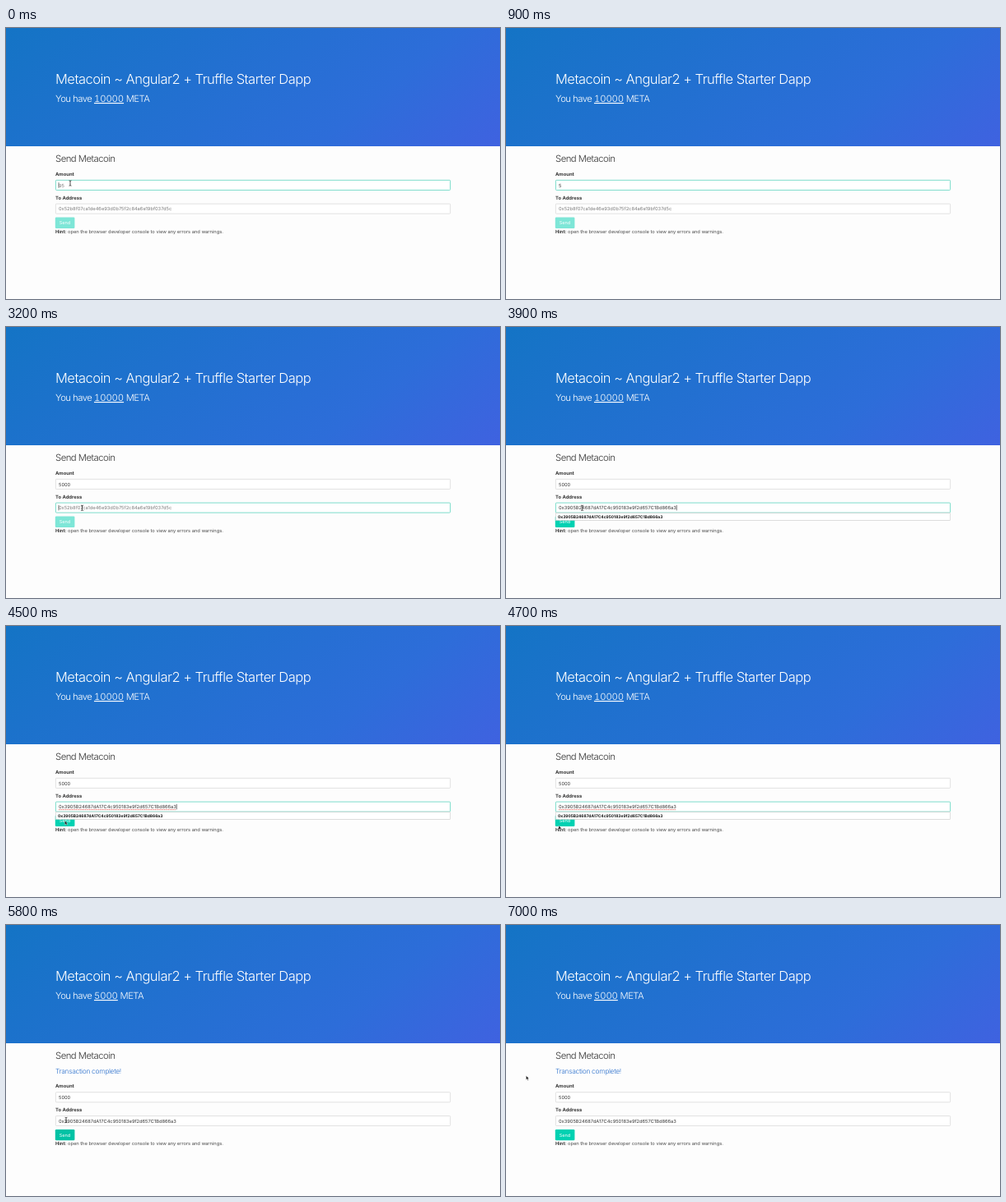
Recreate the animation shown at these times as an HTML page. Size 600 px wide and 330 px high, loop 7100 ms.

```html
<!DOCTYPE html>
<html lang="en">
<head>
<meta charset="utf-8">
<title>Send Metacoin</title>
<style>
  html, body { margin: 0; width: 100%; height: 100%; overflow: hidden; background: #fdfdfd; }
  .hero {
    position: absolute; left: 0; top: 0; width: 600px; height: 144px;
    background: linear-gradient(141deg, #1474c5 0%, #2d6dd9 71%, #3f62e0 100%);
  }
  svg { position: absolute; left: 0; top: 0; display: block; }
  text {
    font-family: Inter, Roboto, sans-serif; font-size: 5.72px;
    fill: #363636; white-space: pre; text-rendering: geometricPrecision;
  }
  .title { font-size: 16.5px; font-weight: 300; letter-spacing: -.0305em; fill: #fff; }
  .sub { font-size: 11.3px; font-weight: 300; letter-spacing: -.046em; fill: #fff; }
  .sub .sum {
    letter-spacing: -.008em; font-variant-numeric: tabular-nums;
    text-decoration: underline; text-decoration-thickness: .7px;
  }
  .head { font-size: 11.35px; font-weight: 300; letter-spacing: -.046em; }
  .note { font-size: 8.45px; font-weight: 300; letter-spacing: -.039em; fill: #2f72cd; }
  .label { font-size: 5.87px; font-weight: 700; }
  .hint { fill: #4a4a4a; }
  .hint tspan { font-weight: 700; fill: #363636; }
  .btn { font-size: 5.5px; fill: #fff; }
  .pick { font-size: 4.9px; font-weight: 700; fill: #111; }
  .field { fill: #fff; stroke: #dbdbdb; stroke-width: .8; }
  .field.on { stroke: #7cdccb; stroke-width: 1; }
</style>
</head>
<body>
<div class="hero"></div>
<svg width="600" height="330" viewBox="0 0 600 330">
  <text class="title" x="60" y="67.5">Metacoin ~ Angular2 + Truffle Starter Dapp</text>
  <text class="sub" x="60" y="90">You have <tspan class="sum" id="sum">10000</tspan> META</text>
  <text class="head" x="60" y="162.8">Send Metacoin</text>
  <text class="note" id="note" x="60" y="181.4">Transaction complete!</text>
  <g id="form">
    <text class="label" x="60" y="180">Amount</text>
    <rect class="field" id="amountBox" x="60.4" y="185.3" width="479.2" height="12.1" rx=".8"/>
    <text id="amount" x="64" y="193.5"></text>
    <text class="label" x="60" y="208.5">To Address</text>
    <rect class="field" id="addressBox" x="60.4" y="214.1" width="479.2" height="12" rx=".8"/>
    <text id="address" x="64" y="222.2"></text>
    <path id="spell" d="M64 223.6H206.5" stroke="#e0524a" stroke-width=".7" stroke-dasharray="1.2 .4"/>
    <rect id="caret" width=".6" height="6.6" fill="#222"/>
    <rect id="button" x="59.8" y="230.6" width="23.6" height="13.3" rx="1.2"/>
    <text class="btn" x="64.8" y="239.3">Send</text>
    <text class="hint" x="60" y="250.1"><tspan>Hint:</tspan> open the browser developer console to view any errors and warnings.</text>
    <g id="list">
      <rect x="60.4" y="226.7" width="479.2" height="8.8" fill="#fff" stroke="#c8c8c8" stroke-width=".6"/>
      <text class="pick" id="pick" x="63" y="232.9"></text>
    </g>
  </g>
  <g id="pointer">
    <path id="beam" fill="none" stroke="#222" stroke-width=".8" d="M-1.4 -3.2Q0 -3.2 0 -2.4Q0 -3.2 1.4 -3.2M0 -2.4V2.4M-1.4 3.2Q0 3.2 0 2.4Q0 3.2 1.4 3.2"/>
    <path id="arrow" fill="#111" stroke="#fff" stroke-width=".4" d="M0 0V5L1.2 3.9L2 5.8L2.9 5.4L2.1 3.6H3.6Z"/>
    <path id="hand" fill="#fff" stroke="#111" stroke-width=".5" d="M-.5 3V0Q0 -.7 .5 0V2L3 2.7Q3.4 4.5 2.5 6H-.3L-1.8 3.5Q-1.5 2.8 -.5 3Z"/>
  </g>
</svg>
<script>
const $ = id => document.getElementById(id);
const LOOP = 7100;
const SAMPLE = "0x52b8f07ca1de46e93d0b75f2c84a6e19bf037d5c";
const WALLET = "0x3905B24687dA17C4c950183e9f2d657C1Bd866a3";
const KEYS = [[300, "5"], [1400, "50"], [1700, "500"], [2000, "5000"]];
const T = { focus: 2900, paste: 3500, spell: 4200, blur: 4900, hover: 5100, done: 5700, leave: 6500 };
const PATH = [
  [0, 78, 189], [2500, 78, 189], [2900, 92.5, 220.3], [4100, 92.5, 220.3],
  [4700, 64, 243], [4800, 49.5, 243], [4900, 49.5, 243], [5200, 72, 237.4],
  [5700, 73, 237.5], [6400, 73, 237.5], [6800, 24.4, 183.5], [LOOP, 24.4, 183.5]
];
// Moments that restart the caret blink
const BEATS = [0, ...KEYS.map(k => k[0]), T.focus, T.paste, T.spell];

const show = (id, on) => $(id).setAttribute("display", on ? "inline" : "none");
const write = (id, text) => { if ($(id).textContent !== text) $(id).textContent = text; };
const ease = p => p * p * (3 - 2 * p);
const last = (list, t) => list.filter(v => v <= t).pop();

function place(t) {
  const i = PATH.findIndex((p, n) => n && t < p[0]);
  const [a, x, y] = PATH[i - 1], [b, u, v] = PATH[i];
  const p = ease((t - a) / (b - a));
  return [x + (u - x) * p, y + (v - y) * p];
}

function setField(id, text, hint, focused) {
  write(id, text || hint);
  $(id).style.fill = text ? "#363636" : "#7a7a7a";
  $(id + "Box").classList.toggle("on", focused);
}

function drawPointer(t, shift) {
  const [x, y] = place(t);
  const inBox = (top, left, right) => x > left && x < right && y > top + shift && y < top + shift + 12.5;
  const hand = inBox(231, 60, 83) && t >= T.blur;
  const beam = inBox(185, 60, 540) || inBox(214, 60, 540);
  $("pointer").setAttribute("transform", `translate(${x} ${y})`);
  show("pointer", t < KEYS[0][0] || t >= 2500);
  show("hand", hand);
  show("beam", beam && !hand);
  show("arrow", !beam && !hand);
}

function draw(t) {
  const done = t >= T.done, pasted = t >= T.paste;
  const shift = done ? 18.4 : 0;
  const typed = KEYS.filter(k => k[0] <= t).pop();
  const amount = typed ? typed[1] : "";
  const onAmount = t < T.focus, onAddress = !onAmount && t < T.blur;

  write("sum", done ? "5000" : "10000");
  show("note", done);
  $("form").setAttribute("transform", `translate(0 ${shift})`);
  setField("amount", amount, "95", onAmount);
  setField("address", pasted ? WALLET : "", SAMPLE, onAddress);
  show("spell", t >= T.spell && t < T.blur);
  show("list", pasted && t < T.blur);
  write("pick", WALLET);

  const field = onAmount ? "amount" : "address";
  const filled = onAmount ? amount : pasted;
  const end = filled ? $(field).getComputedTextLength() : -.3;
  $("caret").setAttribute("x", 64 + end);
  $("caret").setAttribute("y", onAmount ? 188.1 : 216.8);
  show("caret", t < T.blur && (t - last(BEATS, t)) % 1000 < 500);

  const hover = t >= T.hover && t < T.leave;
  $("button").setAttribute("fill", !pasted ? "#7ee6d7" : hover ? "#00c2a5" : "#00d1b2");
  drawPointer(t, shift);
}

function tick() {
  draw(Math.floor(performance.now() % LOOP / 100) * 100);
  requestAnimationFrame(tick);
}
tick();
</script>
</body>
</html>
```
